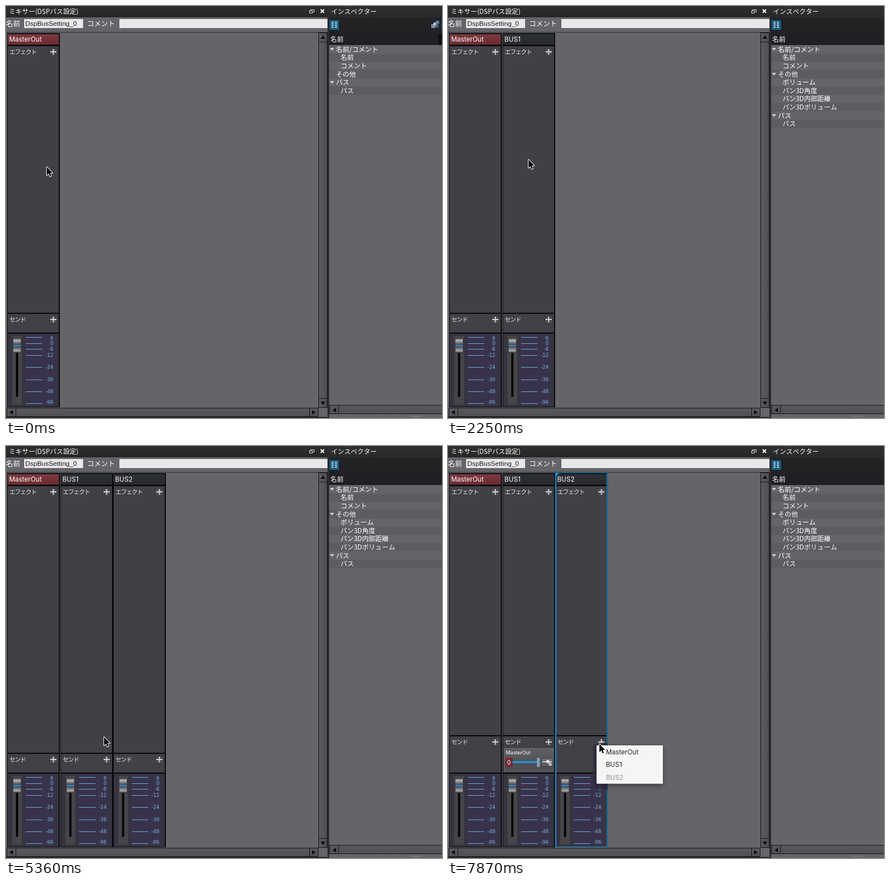
Write an HTML page with a canvas that moves like this. It is 769 by 728 pixels and loops after 8000 ms.

```html
<!DOCTYPE html>
<html lang="ja">
<head>
<meta charset="utf-8">
<title>Mixer</title>
<style>
html, body { margin: 0; width: 100%; height: 100%; overflow: hidden; background: #656469; }
canvas { display: block; }
</style>
</head>
<body>
<canvas id="stage" width="769" height="728"></canvas>
<script>
const ctx = document.getElementById('stage').getContext('2d');
const LOOP = 8000;
const JP = '"Noto Sans CJK JP", "Noto Sans CJK", sans-serif';
const UI = 'Inter, sans-serif';
const ARIAL = '"Liberation Sans", sans-serif';
const SCALE = '"DejaVu Sans", sans-serif';
const BLUE = '#1b93d2';
const PANEL = '#656469';

// [start time, tip x, tip y]
const cursorSteps = [
  [0, 71, 283], [1350, 97, 292], [2100, 124, 280], [2250, 141, 270],
  [3450, 166, 281], [4340, 166, 287], [4490, 167, 310], [4630, 168, 350],
  [4780, 169, 400], [4920, 170, 445], [5070, 171, 485], [5210, 172, 503],
  [5360, 172, 513], [5500, 173, 537], [5640, 174, 554], [6390, 186, 568],
  [6540, 197, 580], [7280, 218, 562], [7430, 250, 535], [7580, 266, 525]
];
// [start time, selected strip]
const selectionSteps = [[0, -1], [450, 0], [1800, -1], [2700, 1], [4050, -1], [5800, 1], [6990, -1], [7720, 2]];

const current = (steps, t) => steps.filter(s => s[0] <= t).pop();
const within = (t, a, b) => t >= a && t < b;

function rect(x, y, w, h, color) {
  ctx.fillStyle = color;
  ctx.fillRect(x, y, w, h);
}

function shade(x, y, w, h, colors, horizontal) {
  const g = horizontal ? ctx.createLinearGradient(x, 0, x + w, 0) : ctx.createLinearGradient(0, y, 0, y + h);
  colors.forEach((c, i) => g.addColorStop(i / (colors.length - 1), c));
  rect(x, y, w, h, g);
}

function frame(x, y, w, h, color) {
  ctx.strokeStyle = color;
  ctx.lineWidth = 1;
  ctx.strokeRect(x + .5, y + .5, w - 1, h - 1);
}

function poly(points, color) {
  ctx.beginPath();
  points.forEach(([x, y]) => ctx.lineTo(x, y));
  ctx.closePath();
  ctx.fillStyle = color;
  ctx.fill();
}

// y is the optical middle of the line
function text(str, x, y, size, color = '#fff', font = JP, align = 'left', spacing = 0) {
  ctx.font = `${font === JP ? 500 : 400} ${size}px ${font}`;
  ctx.textAlign = align;
  ctx.letterSpacing = spacing + 'px';
  ctx.fillStyle = color;
  ctx.fillText(str, x, y + size * .37);
}

function cross(x, y, r, color, width) {
  ctx.beginPath();
  ctx.moveTo(x - r, y - r); ctx.lineTo(x + r, y + r);
  ctx.moveTo(x + r, y - r); ctx.lineTo(x - r, y + r);
  ctx.strokeStyle = color;
  ctx.lineWidth = width;
  ctx.stroke();
}

function bar(x, y, w, h) {
  shade(x, y, w, h, h > w ? ['#5c5b60', '#4e4d52'] : ['#5a595e', '#504f54'], h > w);
  frame(x, y, w, h, '#151517');
}

function arrow(x, y, dx, dy) {
  poly([[x + dx * 3, y + dy * 3], [x - dx * 3 + dy * 4, y - dy * 3 + dx * 4],
    [x - dx * 3 - dy * 4, y - dy * 3 - dx * 4]], '#0a0a0b');
}

function mixerPane() {
  shade(0, 0, 568, 20, ['#2f2f31', '#262628']);
  text('ミキサー(DSPバス設定)', 5, 9.5, 11.6);
  ctx.lineWidth = 1;
  ctx.strokeStyle = '#ddd';
  ctx.strokeRect(537.5, 6.5, 6, 4);
  rect(535, 8, 7, 5, '#29292b');
  ctx.strokeRect(535.5, 8.5, 5, 4);
  cross(558, 9, 3, '#fff', 2);
  text('名前', 0, 31, 12.4);
  rect(32, 23, 104, 16, '#e8e8e8');
  text('DspBusSetting_0', 34, 31, 11.8, '#1c1c1e', ARIAL);
  text('コメント', 143, 31, 12.3);
  rect(200, 23, 367, 16, '#e8e8e8');
  rect(0, 46, 568, 1, '#2b2b2e');

  bar(551, 47, 16, 663);
  bar(551, 47, 16, 17);
  bar(551, 693, 16, 17);
  arrow(559, 55, 0, -1);
  arrow(559, 702, 0, 1);
  bar(1, 710, 550, 16);
  bar(1, 710, 17, 16);
  bar(535, 710, 16, 16);
  arrow(9, 718, -1, 0);
  arrow(543, 718, 1, 0);
  rect(0, 726, 568, 2, '#29292c');
}

function inspector(expanded) {
  rect(567, 0, 3, 728, '#2c2c2f');
  shade(570, 0, 199, 21, ['#303032', '#29292b']);
  text('インスペクター', 573.5, 9.5, 11.5);
  rect(570, 21, 199, 28, '#222225');
  rect(571, 25, 16, 17, '#14587c');
  frame(571, 25, 16, 17, '#0e6c9c');
  for (let i = 0; i < 4; i++) {
    rect(574, 28 + i * 3, 4, 1.3, '#fff');
    rect(580, 28 + i * 3, 4, 1.3, '#fff');
  }
  rect(570, 49, 199, 20, '#202024');
  text('名前', 572, 59, 11.7);
  if (!expanded) {
    rect(750, 32, 7, 7, '#7f8da1');
    rect(754, 29, 6, 6, '#bdc5cf');
    rect(758, 26, 6, 6, '#5c7ca9');
    rect(757, 33, 6, 5, '#4c6382');
    rect(768, 25, 1, 17, '#14587c');
    rect(762, 49, 7, 20, '#111114');
  }

  const params = ['ボリューム', 'パン3D角度', 'パン3D内部距離', 'パン3Dボリューム'];
  const rows = ['>名前/コメント', '名前', 'コメント', expanded ? '>その他' : '=その他',
    ...(expanded ? params : []), '>パス', 'パス'];
  rows.forEach((row, i) => {
    const y = 76.3 + i * 14.63;
    if (i % 2) rect(570, Math.round(y - 7.3), 199, 15, '#5d5c61');
    const head = /^[>=]/.test(row);
    if (row[0] === '>') poly([[571, y - 2], [579, y - 2], [575, y + 2.5]], '#d4d4d6');
    text(head ? row.slice(1) : row, head ? 582 : 590, y, 11.7);
  });

  bar(570, 705, 200, 16);
  bar(570, 705, 17, 16);
  arrow(579, 714, -1, 0);
  rect(570, 721, 199, 7, PANEL);
  for (let x = 715; x < 732; x += 3) rect(x, 724, 1.5, 1.5, '#98979c');
}

function plusButton(x, y) {
  rect(x - 7, y - 7, 15, 15, '#48484f');
  frame(x - 7, y - 7, 15, 15, '#34343a');
  rect(x - 5, y - 1, 11, 2, '#d2d2d4');
  rect(x - .5, y - 5, 2, 10, '#d2d2d4');
}

function strip(x, name, isMaster, sendTop, selected) {
  ctx.save();
  ctx.translate(x, 0);
  rect(2, 48, 93, 661, '#09090b');
  shade(3, 50, 90, 17, isMaster ? ['#7e393f', '#6b2a30'] : ['#2d3036', '#27292f']);
  frame(3, 50, 90, 18, isMaster ? '#883f45' : '#393b42');
  text(name, 5.5, 58.5, 11.6, '#fff', UI);

  rect(3, 71, 90, sendTop - 72, '#404047');
  text('エフェクト', 6, 81, 10.7, '#e6e6e8', JP, 'left', -1.2);
  plusButton(83, 81);
  rect(3, sendTop + 1, 90, 576 - sendTop, '#414148');
  text('センド', 6, sendTop + 11, 10.7, '#e6e6e8', JP, 'left', -1.2);
  plusButton(83, sendTop + 11);

  rect(3, 579, 90, 129, '#36343f');
  rect(10, 582, 19, 123, '#45454a');
  frame(10, 582, 19, 123, '#36363b');
  rect(17, 590, 5, 101, '#2a2a2e');
  rect(18, 591, 3, 99, '#040405');
  shade(12, 587, 15, 26, ['#68686c', '#b4b4b6', '#68696d', '#343b48', '#66676b', '#a8a8aa', '#4c4c50']);
  frame(12, 587, 15, 26, '#333338');
  rect(13, 599, 13, 2, '#2590ee');
  rect(33, 581, 55, 125, '#39324b');
  [[6, 585], [0, 596], [-6, 606], [-12, 617], [-24, 638], [-36, 660], [-48, 681], [-96, 702]].forEach(([db, y]) => {
    rect(35, y, 29, 1, '#68aeda');
    text(String(db), 83.5, db === 6 ? 587 : db === -96 ? 700 : y, 8.6, '#70b9df', SCALE, 'right');
  });
  if (selected) {
    rect(2, 47, 2, 662, BLUE);
    rect(93, 47, 1.5, 662, BLUE);
    rect(2, 47, 92, 1, BLUE);
    rect(2, 708, 92, 1, BLUE);
    poly([[3, 48], [9, 48], [3, 54]], BLUE);
  }
  ctx.restore();
}

function sendSlot() {
  shade(99, 534, 88, 41, ['#5e5e63', '#4b4b51']);
  frame(99, 534, 88, 41, '#6c6c71');
  text('MasterOut', 102, 541.5, 8.8, '#fff', UI);
  rect(101, 551, 13, 16, '#742b34');
  text('0', 107.5, 559, 10, '#fff', UI, 'center');
  rect(114, 557, 44, 3, '#169fe3');
  shade(157, 551, 6, 16, ['#a2b3c4', '#64778d'], true);
  shade(164, 551, 22, 16, ['#707075', '#57575c']);
  frame(164, 551, 22, 16, '#3a3a3e');
  rect(167, 557, 16, 1.5, '#eee');
  rect(174, 555, 4, 5, '#fff');
  poly([[180, 559], [183, 562], [177, 562]], '#fff');
  rect(178, 563, 5, 1.5, '#fff');
}

function menu(x, y, w, items, hot, alpha, tinted) {
  const row = 22.5, h = items.length * row;
  const isBus = items.length === 2;
  ctx.save();
  if (tinted) {
    ctx.save();
    ctx.beginPath();
    ctx.rect(97, 47, 185, 662);
    ctx.clip();
    ctx.beginPath();
    ctx.roundRect(x - 6, y - 4, w + 12, h + 15, 10);
    ctx.fillStyle = 'rgba(52,44,72,.8)';
    ctx.fill();
    ctx.restore();
  }
  ctx.globalAlpha = alpha;
  if (alpha === 1) {
    ctx.shadowColor = 'rgba(0,0,0,.4)';
    ctx.shadowBlur = 9;
    ctx.shadowOffsetY = 3;
    rect(x, y, w, h, '#f5f5f5');
    ctx.shadowColor = 'transparent';
  }
  items.forEach(([label, enabled], i) => {
    const lit = hot && i === 0;
    const mid = y + row * i + 11.5;
    const color = lit ? '#fff' : enabled ? '#242426' : '#8f8f91';
    rect(x, y + row * i, w, row, lit ? '#457fa7' : '#f5f5f5');
    text(label, x + (isBus ? 24.5 : 16.5), mid, isBus ? 12 : 11.6, color, isBus ? JP : UI);
    if (isBus && i === 1) {
      ctx.globalAlpha = Math.max(alpha, .8);
      cross(x + 10, mid, 5, enabled ? '#9c2535' : '#8b8b8d', 2);
    }
  });
  ctx.restore();
}

function menus(t) {
  const busMenu = (x, y, removable, hot, alpha, tinted) =>
    menu(x, y, 187, [['DSPバスの追加...', true], ['削除', removable]], hot, alpha, tinted);
  const sendMenu = (x, y, own, hot, alpha) =>
    menu(x, y, 117, ['MasterOut', 'BUS1', 'BUS2'].map((n, i) => [n, i !== own]), hot, alpha, true);

  if (within(t, 750, 1950)) busMenu(73, 284, false, t >= 1350, t < 1800 ? 1 : .4, false);
  if (within(t, 3000, 4190)) busMenu(143, 271, true, t >= 3450, t < 4050 ? 1 : .4, t >= 4050);
  if (within(t, 5950, 7140)) sendMenu(169, 560, 1, t >= 6390, t < 6990 ? 1 : .4);
  if (t >= 7870) sendMenu(262, 529, 2, false, 1);
}

function cursor(x, y) {
  ctx.save();
  ctx.translate(x + 1, y + 1.5);
  ctx.beginPath();
  [[0, 0], [0, 14.5], [3.4, 11.4], [5.6, 16.6], [8, 15.6], [5.8, 10.6], [10, 10.4]].forEach(([a, b]) => ctx.lineTo(a, b));
  ctx.closePath();
  ctx.lineJoin = 'round';
  ctx.lineWidth = 2;
  ctx.strokeStyle = '#fff';
  ctx.stroke();
  ctx.fillStyle = '#000';
  ctx.fill();
  ctx.restore();
}

function draw(t) {
  rect(0, 0, 769, 728, PANEL);
  mixerPane();
  inspector(t >= 450);
  const hasSend = t >= 6990;
  const sendTop = hasSend ? 512 : 543;
  const selected = current(selectionSteps, t)[1];
  const count = t < 1800 ? 1 : t < 4050 ? 2 : 3;
  const offsets = [0, 94, 187];
  ['MasterOut', 'BUS1', 'BUS2'].slice(0, count).forEach((name, i) =>
    strip(offsets[i], name, i === 0, sendTop, i === selected));
  if (hasSend) sendSlot();
  menus(t);
  const [, x, y] = current(cursorSteps, t);
  cursor(x, y);
}

const start = performance.now();
function tick() {
  draw((performance.now() - start) % LOOP);
  requestAnimationFrame(tick);
}
tick();
</script>
</body>
</html>
```
